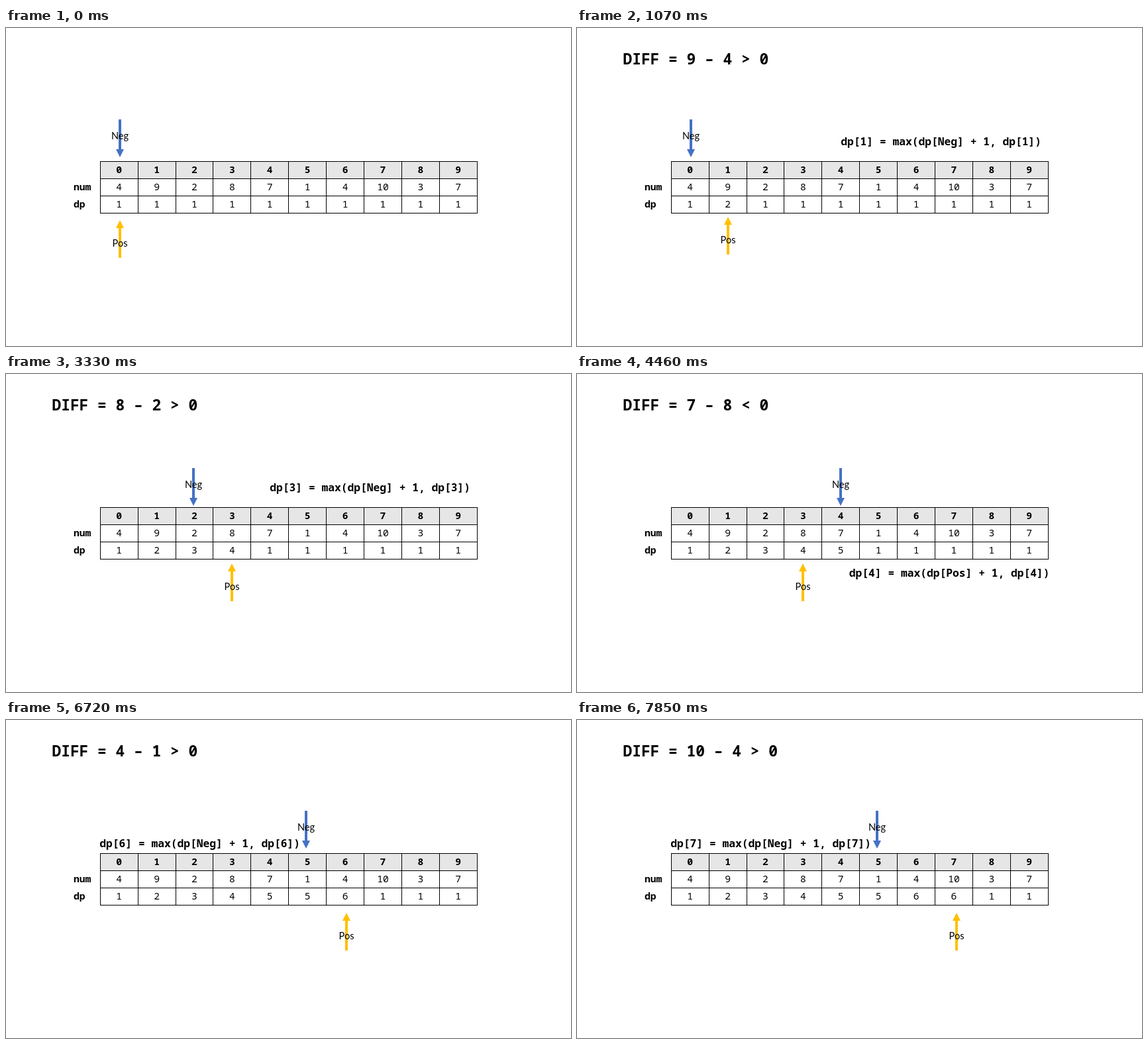
These frames come from a looping animation (853x480 px, 8000 ms). An HTML page:

```html
<!DOCTYPE html>
<html lang="en">
<head>
<meta charset="utf-8">
<title>Wiggle subsequence</title>
<style>
  html, body { margin: 0; width: 100%; height: 100%; overflow: hidden; background: #fff; }
  svg { display: block; width: 853px; height: 480px; }
  text { white-space: pre; fill: #000; }
  .mono { font: 14.66px "Noto Sans Mono", monospace; }
  .bold { font-weight: 700; }
  .title { font-size: 22.92px; }
  .formula { font-size: 16.3px; }
  .tag { font: 14.6px Lato, sans-serif; }
  .mid { text-anchor: middle; }
</style>
</head>
<body>
<svg id="stage" viewBox="0 0 853 480"></svg>
<script>
const stage = document.getElementById('stage');
const LOOP = 8000, FIRST = 1070, STEP = 1130;
const LEFT = 142, TOP = 201, COL = 56.9, ROW = 26;
const nums = [4, 9, 2, 8, 7, 1, 4, 10, 3, 7];
const lengths = [1, 2, 3, 4, 5, 5, 6, 6];

// neg: [x, top of shaft], pos: [x, bottom of shaft], at: formula origin
const scenes = [
  { neg: [172, 138], pos: [172, 347] },
  { diff: '9 – 4 > 0', from: 'Neg', at: [398.3, 177], neg: [172, 138], pos: [228, 342] },
  { diff: '2 – 9 < 0', from: 'Pos', at: [398.3, 177], neg: [283, 142], pos: [228, 342] },
  { diff: '8 – 2 > 0', from: 'Neg', at: [398.3, 177], neg: [283, 142], pos: [341, 343] },
  { diff: '7 – 8 < 0', from: 'Pos', at: [410.8, 306], neg: [398, 142], pos: [341, 343] },
  { diff: '1 – 7 < 0', from: 'Pos', at: [414.8, 306], neg: [453, 137], pos: [341, 343] },
  { diff: '4 – 1 > 0', from: 'Neg', at: [141.3, 192], neg: [453, 137], pos: [514, 348] },
  { diff: '10 – 4 > 0', from: 'Neg', at: [141.3, 192], neg: [453, 137], pos: [573, 348] }
];

function add(tag, attrs, parent = stage) {
  const el = document.createElementNS('http://www.w3.org/2000/svg', tag);
  for (const key in attrs) el.setAttribute(key, attrs[key]);
  return parent.appendChild(el);
}

function label(value, x, y, cls) {
  const el = add('text', { x, y, class: cls });
  el.textContent = value;
  return el;
}

function move(el, [x, y]) {
  el.setAttribute('transform', `translate(${x} ${y})`);
}

function arrow(name, color, dir, baseline) {
  const g = add('g', {});
  add('path', { d: `M-2 0H2V${45 * dir}H6L0 ${57 * dir}L-6 ${45 * dir}H-2Z`, fill: color }, g);
  g.appendChild(label(name, 0, baseline, 'tag mid'));
  return g;
}

add('rect', { x: LEFT, y: TOP, width: COL * 10, height: ROW, fill: '#e7e6e6' });
let grid = '';
for (let r = 0; r < 4; r++) grid += `M${LEFT} ${TOP + r * ROW + .5}H${LEFT + COL * 10 + 1}`;
for (let c = 0; c <= 10; c++) grid += `M${Math.floor(LEFT + c * COL + .2) + .5} ${TOP}V${TOP + 3 * ROW + 1}`;
add('path', { d: grid, stroke: '#000', fill: 'none', 'shape-rendering': 'crispEdges' });

const cell = (value, c, r, cls = '') =>
  label(value, LEFT + (c + .5) * COL + .2, TOP + r * ROW + 18.4, 'mono mid ' + cls);
nums.forEach((n, c) => {
  cell(c, c, 0, 'bold');
  cell(n, c, 1);
});
const dpCells = nums.map((_, c) => cell(1, c, 2));
label('num', 102, 245.4, 'mono bold');
label('dp', 102, 271.4, 'mono bold');

const title = label('', 69.4, 55, 'mono bold title');
const formula = label('', 0, 0, 'mono bold formula');
const neg = arrow('Neg', '#4472c4', 1, 30.4);
const pos = arrow('Pos', '#ffc000', -1, -17);

let shown = -1;
function show(i) {
  if (i === shown) return;
  shown = i;
  const s = scenes[i];
  title.textContent = s.diff ? `DIFF = ${s.diff}` : '';
  formula.textContent = s.from ? `dp[${i}] = max(dp[${s.from}] + 1, dp[${i}])` : '';
  if (s.at) move(formula, s.at);
  move(neg, s.neg);
  move(pos, s.pos);
  dpCells.forEach((el, c) => { el.textContent = c <= i ? lengths[c] : 1; });
}

const start = performance.now();
function tick() {
  const t = (performance.now() - start) % LOOP;
  show(t < FIRST ? 0 : 1 + Math.floor((t - FIRST) / STEP));
  requestAnimationFrame(tick);
}
tick();
</script>
</body>
</html>
```
